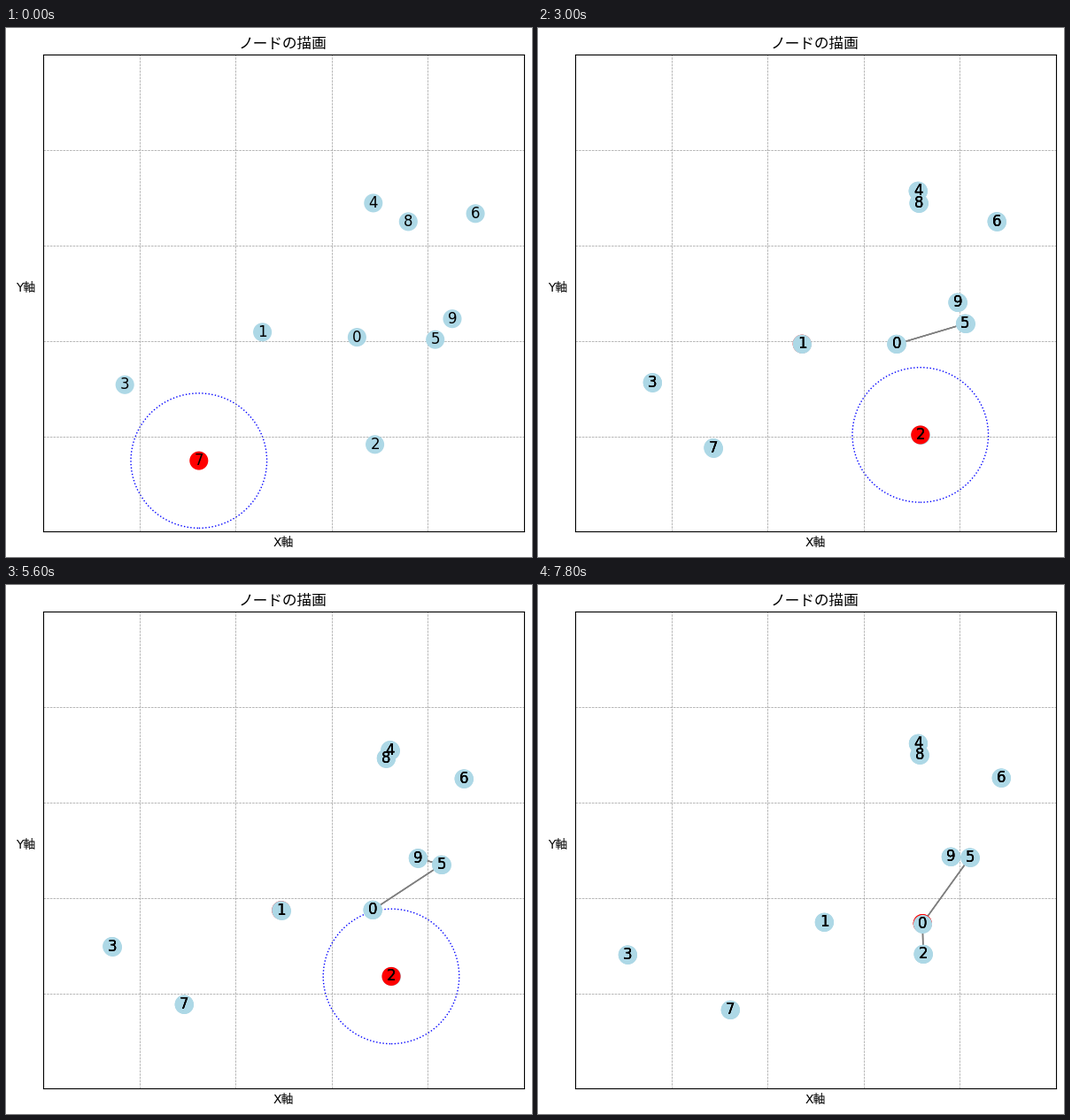
Animation of 594 by 598 pixels, one loop 8 s. Source, as a matplotlib script:

```python
import numpy as np
import matplotlib.pyplot as plt
from matplotlib.animation import FuncAnimation
from matplotlib.collections import LineCollection
from matplotlib.patches import Circle

W, H, DPI = 594, 598, 100
LEFT, RIGHT, TOP, BOTTOM = 42, 585, 30.4, 569.4
REACH = np.sqrt(0.02)
FRAMES = 40

plt.rcParams["font.family"] = ["DejaVu Sans", "Noto Sans CJK JP"]

# Path of each node in pixels: key points reached at the steps in KEY_STEPS.
KEY_STEPS = (0, 2, 4, 7)
PATHS = np.array([
    [(396.4, 349.6), (402.6, 352.7), (407, 362), (434.2, 382.55)],
    [(289.6, 343.8), (290, 351.3), (306.3, 363), (323.3, 381.2)],
    [(416.6, 470.8), (428.55, 468.7), (435, 451.2), (435, 417.3)],
    [(134.2, 403.3), (132.2, 396.2), (126.3, 405.2), (101.3, 418)],
    [(414.8, 197.9), (423, 179.2), (435.3, 189.3), (429.4, 179.2)],
    [(484.7, 352.2), (472, 349.2), (493, 319.2), (487.8, 308)],
    [(530.1, 209.8), (521.2, 218.1), (515, 219.3), (523.2, 218)],
    [(217.8, 489.1), (200.3, 477.1), (195.55, 472), (217.2, 480.3)],
    [(454.3, 218.9), (431.2, 199.1), (428.8, 197), (430.9, 192)],
    [(504, 328.7), (482.8, 311.2), (465, 309.2), (466.3, 307.2)],
])
NODES = range(len(PATHS))

# Nodes that broadcast in each step, in turn.
SENDERS = ("7", "27", "027", "129", "127", "123", "07", "0")


def positions(step):
    """Node centres in axes units, eased between key points."""
    k = min(np.searchsorted(KEY_STEPS, step, side="right"), len(KEY_STEPS) - 1)
    start, end = KEY_STEPS[k - 1], KEY_STEPS[k]
    t = (step - start) / (end - start)
    t = t * t * (3 - 2 * t)
    px = (1 - t) * PATHS[:, k - 1] + t * PATHS[:, k]
    return (px - (LEFT, BOTTOM)) / (RIGHT - LEFT, TOP - BOTTOM)


def build_timeline():
    """Each frame holds the layers drawn since the last move."""
    timeline, links = [], []
    for step, senders in enumerate(SENDERS):
        pos = positions(step)
        layers = []

        def show(sender):
            layers.append((pos, sender, tuple(links)))
            timeline.append(tuple(layers))

        for s in map(int, senders):
            show(s)
            dist = np.hypot(*(pos - pos[s]).T)
            near = [n for n in NODES if n != s and dist[n] < REACH]
            if near:
                links += [(s, n) for n in near if (s, n) not in links]
                show(s)
            show(None)
    return timeline[:FRAMES]


fig = plt.figure(figsize=(W / DPI, H / DPI), dpi=DPI, facecolor="white")
ax = fig.add_axes([LEFT / W, 1 - BOTTOM / H, (RIGHT - LEFT) / W, (BOTTOM - TOP) / H])
ticks = np.linspace(0, 1, 6)[1:-1]
ax.set(xlim=(0, 1), ylim=(0, 1), xticks=ticks, yticks=ticks)
ax.tick_params(length=0, labelleft=False, labelbottom=False)
ax.grid(True, linestyle="--", linewidth=0.5, color="gray", alpha=0.8)


def caption(x, y, text, size):
    fig.text(x / W, 1 - y / H, text, size=size, ha="center", va="baseline")


caption(312.5, 22.5, "ノードの描画", 12)
caption(313.5, 586, "X軸", 10)
caption(22, 298, "Y軸", 10)

timeline = build_timeline()
drawn = []


def draw_layer(pos, sender, links):
    lines = [(pos[a], pos[b]) for a, b in links]
    drawn.append(ax.add_collection(
        LineCollection(lines, colors="gray", linewidths=1, zorder=1)))
    colors = "lightblue"
    if sender is not None:
        colors = ["red" if n == sender else "lightblue" for n in NODES]
    drawn.append(ax.scatter(*pos.T, s=200, c=colors, linewidths=1, zorder=2))
    for n, (x, y) in enumerate(pos):
        drawn.append(ax.text(x, y, str(n), size=12, family="DejaVu Sans",
                             ha="center", va="center"))


def update(i):
    while drawn:
        drawn.pop().remove()
    for layer in timeline[i]:
        draw_layer(*layer)
    pos, sender, _ = timeline[i][-1]
    if sender is not None:
        drawn.append(ax.add_patch(Circle(
            pos[sender], REACH, fill=False, edgecolor="blue",
            linestyle="dotted", linewidth=1, zorder=1)))
    return drawn


anim = FuncAnimation(fig, update, frames=FRAMES, interval=200, repeat=True,
                     repeat_delay=0, blit=False)
plt.show()
```
